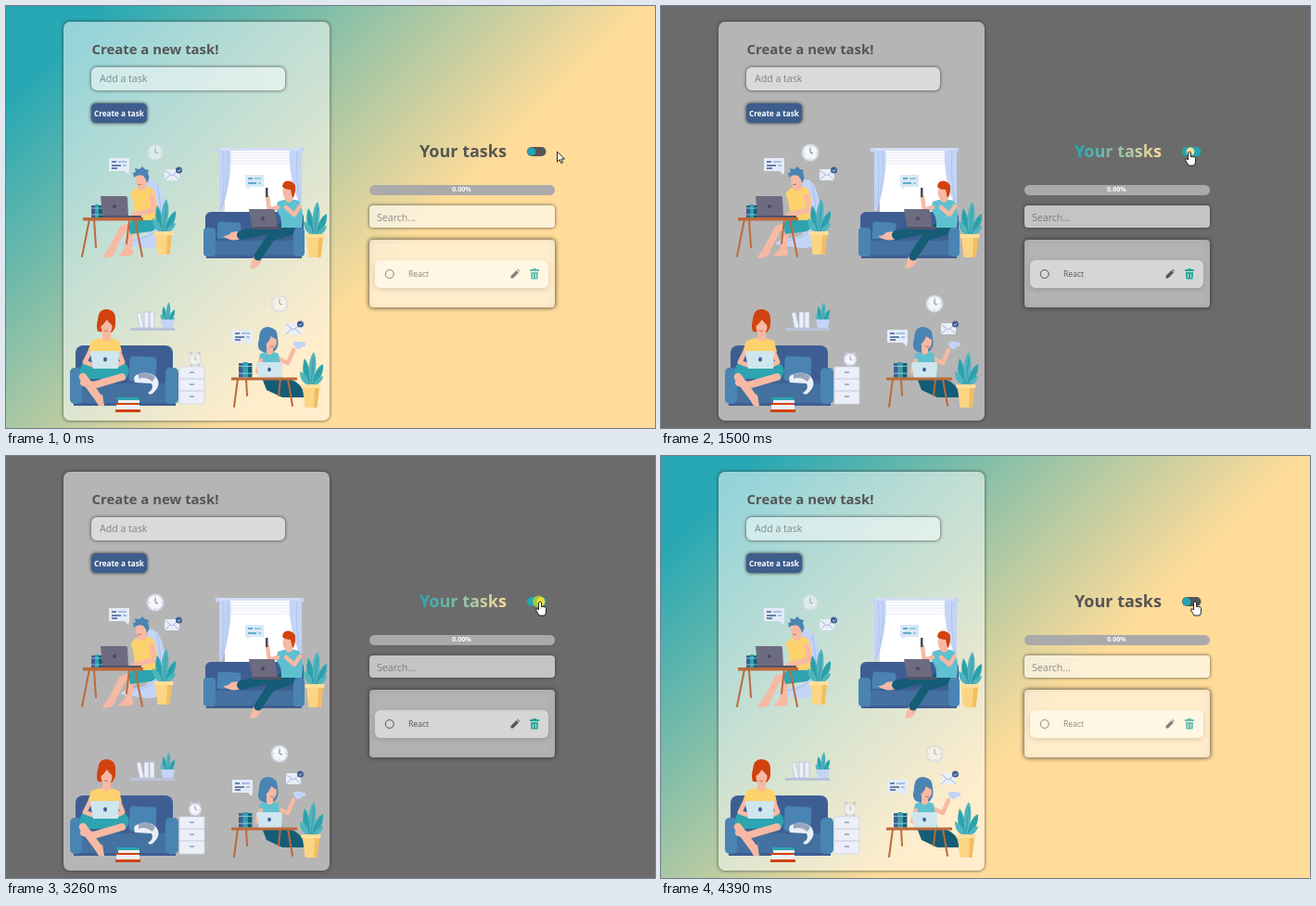
Recreate the animation shown at these times as an HTML page. Size 700 by 455 pixels, loop 4.51 s.

```html
<!DOCTYPE html>
<html lang="en">
<head>
<meta charset="utf-8">
<title>Task list theme toggle</title>
<style>
html, body { margin: 0; width: 100%; height: 100%; overflow: hidden; }
#stage { position: relative; width: 700px; height: 455px; overflow: hidden;
  background: linear-gradient(135deg, #27a8b4 9%, #ffdc99 60%); }
#stage.dark { background: #6b6b6b; }
#stage div { position: absolute; box-sizing: border-box; }
svg { position: absolute; left: 0; top: 0; }
text { font-family: "Open Sans", "Noto Sans", sans-serif; }
.bold { font-weight: 700; }

#panel { left: 62px; top: 17px; width: 287px; height: 430px; border-radius: 7px;
  background: #ffffff80; box-shadow: 0 0 3px 1px #3338; }
#field { left: 92px; top: 66px; width: 209px; height: 25px; border-radius: 6px;
  background: #ffffff80; box-shadow: 0 0 3px 1px #3338; }
#button { left: 92px; top: 105px; width: 60px; height: 21px; border-radius: 5px;
  background: #3d5d8d; box-shadow: 0 0 3px 1px #333a; }
#bar { left: 392px; top: 193px; width: 200px; height: 11px; border-radius: 6px; background: #aaa; }
#search { left: 392px; top: 215px; width: 200px; height: 24px; border-radius: 4px;
  background: #fff9; box-shadow: 0 0 3px 1px #3338; }
#list { left: 392px; top: 252px; width: 200px; height: 73px; border-radius: 4px;
  background: #ffffff7c; box-shadow: 0 0 4px 1px #333b, inset 0 0 8px #0001; }
#item { left: 398px; top: 274px; width: 187px; height: 30px; border-radius: 6px;
  background: #ffffff74; box-shadow: 0 2px 6px #0002; }

.s { fill: #f7b9a3; } .y { fill: #fdd26d; } .n { fill: #3e5e93; }
.b { fill: #4a84b3; } .t { fill: #2da4af; } .d { fill: #155c76; }
.l { fill: #c3d4f7; } .w { fill: #eceff8; } .o { fill: #bb6a3b; }
.r { fill: #d2420f; } .g { fill: #6d6b80; } .c { fill: #5fc0cf; }
.i { fill: #cfe6ee; }
.limb { fill: none; stroke: #f7b9a3; stroke-linecap: round; stroke-linejoin: round; }
.leg { stroke: #155c76; }
.line { fill: none; stroke: #bb6a3b; stroke-width: 2; stroke-linecap: round; }
.hint { fill: #505050a0; font-size: 10.6px; }
#heading, #title { fill: #555; }
.dark #heading { fill: url(#sweep); }
#clock { opacity: .6; }
#task { opacity: .7; }
.dark #clock, .dark #task { opacity: 1; }
#pill { fill: #555; }
#knob { fill: #22a6b3; }
.dark #pill { fill: #22a6b3; }
.dark #knob { fill: #ffdc99; }
#hand, #arrow { fill: #fff; stroke: #111; stroke-width: .9; stroke-linejoin: round; }
</style>
</head>
<body>
<div id="stage">
  <div id="panel"></div><div id="field"></div><div id="button"></div>
  <div id="bar"></div><div id="search"></div><div id="list"></div><div id="item"></div>

  <svg width="700" height="455">
    <defs>
      <linearGradient id="sweep" gradientUnits="userSpaceOnUse" x1="446" x2="540">
        <stop stop-color="#22a6b3"/><stop offset="1" stop-color="#ffdc99"/>
      </linearGradient>
      <g id="leaves">
        <path class="t" d="M-1 1C-8-5-11-16-7-28C-2-22 0-10-1 1M1 1C2-8 6-19 13-22C14-12 9-3 1 1"/>
        <path fill="#4fb4bd" d="M0 1C-4-10-3-28 3-35C7-27 6-12 0 1M-1 1C-8 0-12-5-12-14C-6-12-2-6-1 1M1 1C5-5 8-8 13-9C12-3 8 1 1 1"/>
        <path d="M0 0L3-29M-1 0L-7-22M1 0L11-18" fill="none" stroke="#2b8b9c" stroke-width=".6"/>
      </g>
      <g id="plant">
        <use href="#leaves"/>
        <path fill="#fbd583" d="M-9 3H9L6.500 25H-6.500Z"/>
        <path fill="#f3bd5f" d="M4 4H9L6.500 25H3Z"/>
        <rect fill="#ffe09a" x="-10.500" width="21" height="4" rx="1"/>
      </g>
      <g id="clock">
        <circle r="9.500" fill="#cfd6e6"/><circle r="7.700" fill="#f5f6fa"/>
        <path d="M0-5V0L3 1" fill="none" stroke="#777b8c"/>
        <path d="M0-7v1M0 6v1M-7 0h1M6 0h1" stroke="#9aa" stroke-width=".8"/>
      </g>
      <g id="bubble">
        <path fill="#e4ebf8" d="M0 0H22V14L21 18L17 14H0Z"/>
        <path d="M3 4H8M3 8H13M3 11H9" stroke="#3e5e93" stroke-width="1.600"/>
        <path d="M10 4H19M15 8H19" stroke="#8fb4dc" stroke-width="1.600"/>
      </g>
      <g id="mail">
        <path fill="#e9eefa" d="M0 0H16V12H0Z"/>
        <path d="M0 1L8 7L16 1M0 12L6 6M16 12L10 6" fill="none" stroke="#9aa8c9" stroke-width=".8"/>
        <circle class="n" cx="15.500" cy="1" r="3.500"/>
        <path d="M14 1l1.200 1.300L17.500 0" fill="none" stroke="#fff" stroke-width=".8"/>
      </g>
      <g id="books">
        <path class="n" d="M0 1H4V15H0Z"/><path class="t" d="M4 0H8V15H4Z"/><path class="d" d="M8 1H12V15H8Z"/>
        <path d="M0 4H12M0 11H12" stroke="#9cd3df" stroke-width=".8"/>
      </g>
    </defs>

    <text id="title" class="bold" x="92.500" y="52" font-size="14.900">Create a new task!</text>
    <text class="hint" x="101" y="82">Add a task</text>
    <text class="bold" x="95" y="119" font-size="8.200" fill="#fff">Create a task</text>

    <!-- man at a desk -->
    <g>
      <use href="#bubble" x="111" y="164"/><use href="#clock" x="161" y="158"/><use href="#mail" x="171" y="176"/>
      <path class="l" d="M152 188C166 181 173 208 173 238C174 256 168 261 150 261L124 257C122 251 150 250 153 246Z"/>
      <path d="M163 193Q168 215 166 236Q160 250 132 254" fill="none" stroke="#a6bdee"/>
      <path class="limb" stroke-width="7.500" d="M152 238L134 244L132 262"/>
      <path class="limb" stroke-width="7.500" d="M148 234L126 240L114 263"/>
      <path class="s" d="M110 262L118 266Q114 273 104 271ZM128 262H137V268Q130 271 121 269Z"/>
      <path class="t" d="M138 228H163Q165 240 157 243L134 246L132 236Z"/>
      <path class="y" d="M139 197Q148 193 157 196Q164 203 163 231H139Q139 210 134 203Z"/>
      <path class="limb" stroke-width="5.500" d="M157 205L160 220L138 225"/>
      <path class="s" d="M142 190H151V197Q147 201 142 197Z"/>
      <ellipse class="s" cx="146" cy="188" rx="6" ry="8"/>
      <path class="b" d="M138 185L137 180L140 179L139 175L144 176L147 173L150 176L154 177L153 180Q156 186 152 191Q151 186 148 183Q142 181 138 185Z"/>
      <path d="M142 192q2 1.500 4 0" fill="none" stroke="#b65c50" stroke-width=".8"/>
      <use href="#books" x="92" y="214"/>
      <path class="g" d="M102 205H129Q131 205 131 207L132 227H104Z"/><path fill="#55536a" d="M104 226H146V228H104Z"/>
      <circle cx="117" cy="216" r="2" fill="#4b4960"/>
      <path class="line" d="M90 230L82 270M95 230L97 260M139 230L147 270M133 230L130 256"/>
      <path class="o" d="M83 228H148V231.500H83Z"/>
      <use href="#plant" x="170" y="243"/>
    </g>

    <!-- man on a sofa by the window -->
    <g>
      <path fill="#fff" d="M236 156H315V222H236Z"/>
      <path d="M237 158H314M237 161H314M237 164H314M237 167H314M237 170H314" stroke="#e3e8f3"/>
      <path class="l" d="M230 154H242Q245 182 233 221H230ZM319 154H306Q304 182 316 213H319Z"/>
      <path d="M234 156Q237 190 232 219M239 156Q241 185 234 215M314 156Q312 185 317 210" fill="none" stroke="#aebfe9" stroke-width=".8"/>
      <path d="M227 154.500H320" stroke="#d4def3" stroke-width="3"/>
      <circle class="l" cx="228" cy="155" r="2.500"/><circle class="l" cx="319" cy="155" r="2.500"/>
      <path fill="#d9e8f6" d="M258 182H278V195H264L260 198V195H258Z"/>
      <path d="M261 186H266M261 191H270" stroke="#3f94bd" stroke-width="1.500"/>
      <path d="M268 186H275M272 191H275" stroke="#76c6d0" stroke-width="1.500"/>
      <rect class="n" x="215" y="222" width="106" height="42" rx="6"/>
      <rect class="b" x="228" y="233" width="25" height="19" rx="3" transform="rotate(4 240 242)"/>
      <path fill="#44719f" d="M222 251H313V269H222Z"/><path d="M222 252H313" stroke="#345588"/>
      <path class="n" d="M216 269H319V272H216Z"/>
      <rect class="b" x="213" y="239" width="13" height="31" rx="4"/><rect class="b" x="310" y="239" width="12" height="31" rx="4"/>
      <path class="s" d="M250 243L254 251Q243 255 234 248Q240 248 243 244ZM267 270L276 274Q272 284 263 283Z"/>
      <path class="limb leg" stroke-width="10" d="M307 239L276 242L254 247"/>
      <path class="limb leg" stroke-width="9" d="M306 243L286 249L272 270"/>
      <path class="c" d="M293 211Q304 206 316 210Q322 220 319 239H297Q298 226 291 220Z"/>
      <path class="limb" stroke-width="4.500" d="M293 217L284 220L282 206"/>
      <path fill="#4b4960" d="M280 196H282.500V206H280Z"/>
      <path class="limb" stroke-width="4.500" d="M317 216L311 225L302 217"/>
      <path class="s" d="M301 203H309V210Q304 214 301 209Z"/><ellipse class="s" cx="304" cy="201" rx="5.500" ry="8"/>
      <path class="r" d="M298 195Q299 187 307 189Q313 191 312 199Q311 206 309 207L307 198Q301 198 298 195Z"/>
      <path class="g" d="M262 219H288Q290 219 290 221L293 240H266Z"/><path fill="#55536a" d="M266 238H297V241H266Z"/>
      <circle cx="277" cy="229" r="2" fill="#4b4960"/>
      <use href="#plant" x="333" y="246"/>
    </g>

    <!-- woman on a sofa -->
    <g>
      <path fill="#bac3d9" d="M134 347H182V350H134Z"/>
      <path class="w" stroke="#b7c0d6" stroke-width=".7" d="M141 331L145 330L149 347H144ZM149 330H154V347H149ZM155 330H160V347H155Z"/>
      <use href="#leaves" transform="translate(174 341) scale(.62)"/><path class="l" d="M167 338H182L180 347H169Z"/>
      <path class="w" stroke="#cbd3e4" stroke-width=".7" d="M187 389H214V429H187Z"/>
      <path d="M187 402H214M187 415H214" stroke="#c1cadd"/>
      <path d="M198 395H203M198 408H203M198 421H203" stroke="#8f9db9" stroke-width="1.500"/>
      <path d="M198 375l3-2M207 373l3 2M199 388l2-2M209 388l-2-2" stroke="#bcc6dc" stroke-width="2"/>
      <use href="#clock" transform="translate(204 381) scale(.75)"/>
      <rect class="n" x="75" y="366" width="105" height="46" rx="8"/>
      <rect class="b" x="133" y="378" width="29" height="27" rx="4" transform="rotate(3 147 391)"/>
      <path fill="#44719f" d="M78 405H176V428H78Z"/><path d="M78 406H176" stroke="#355789"/>
      <path class="n" d="M73 428H183V431H73Z"/>
      <rect class="b" x="69" y="390" width="13" height="39" rx="5"/><rect class="b" x="172" y="390" width="14" height="39" rx="5"/>
      <path class="w" d="M139 406Q136 398 143 397Q153 393 162 400Q168 408 160 416Q156 421 153 417Q160 413 157 407Z"/>
      <path fill="#9ba5ba" d="M143 397Q152 393 161 400L158 405Q150 399 143 402Z"/>
      <path class="t" d="M82 386H129Q136 393 129 402H87Q75 400 82 386Z"/>
      <path class="limb" stroke-width="8" d="M125 400L94 409L84 406"/>
      <path class="limb" stroke-width="8.500" d="M83 400L100 423"/><path class="s" d="M95 421L104 419L106 431Q100 433 98 428Z"/>
      <path class="y" d="M92 361Q107 354 122 361L125 373L119 375V388H94V375L88 373Z"/>
      <path class="limb" stroke-width="5" d="M90 374L85 384L96 388M122 374L126 384L118 388"/>
      <path class="r" d="M99 351Q97 345 99 338Q100 326 109 327Q119 328 118 340Q119 347 114 352Z"/>
      <path class="s" d="M104 350H113V359Q108 364 104 359Z"/><ellipse class="s" cx="108.500" cy="346" rx="6" ry="8"/>
      <path class="r" d="M101 346Q101 336 108 333Q116 336 117 346Q111 342 109 338Q106 343 101 346Z"/>
      <path d="M106 350q2 1.500 4 0" fill="none" stroke="#b65c50" stroke-width=".8"/>
      <path class="i" d="M92 372H121Q123 372 122 375L121 391H94L91 375Q90 372 92 372Z"/>
      <ellipse class="n" cx="107" cy="381" rx="2" ry="2.500"/>
      <path class="t" d="M119 422H143L144 425H120Z"/><path class="w" d="M121 425H144V428H121Z"/>
      <path class="r" d="M118 428H143V430H118Z"/><path class="w" d="M119 430H144V435H119Z"/><path class="r" d="M118 435H145V438H118Z"/>
    </g>

    <!-- woman with a cup -->
    <g>
      <use href="#clock" x="295" y="321"/><use href="#bubble" x="244" y="349"/><use href="#mail" x="302" y="342"/>
      <path class="d" d="M276 401H302Q322 406 321 422H298L281 414Z"/>
      <path class="limb" stroke-width="4.500" d="M293 380L304 385L310 371"/>
      <path class="c" d="M274 375Q285 370 294 375L298 402H276L272 386Z"/>
      <path class="limb" stroke-width="4.500" d="M275 382L271 394L281 398"/>
      <path class="l" d="M310 362H320Q320 370 315 370Q310 369 310 362ZM320 363h3v4h-4z"/>
      <path class="b" d="M275 372Q270 369 273 359Q273 346 283 346Q293 347 293 358Q295 367 290 372Q282 376 275 372Z"/>
      <path class="s" d="M281 365H288V374Q284 378 281 374Z"/><ellipse class="s" cx="286" cy="362" rx="6" ry="8"/>
      <path class="b" d="M278 367Q276 352 285 351Q293 353 293 360Q288 358 286 356Q284 362 278 367Z"/>
      <path d="M285 367q2 1.200 4 0" fill="none" stroke="#b65c50" stroke-width=".8"/>
      <use href="#books" transform="translate(251 384) scale(1.2 1.1)"/>
      <path class="i" d="M271 384H296Q298 384 298 386L297 401H273L270 386Z"/><ellipse class="n" cx="284" cy="392" rx="1.800" ry="2.300"/>
      <path class="line" d="M250 402L246 432M304 402L309 431M259 402L260 420M296 402L294 420"/>
      <path class="o" d="M243 400.500H314V403.500H243Z"/>
      <use href="#plant" x="329" y="408"/>
    </g>

    <text id="heading" class="bold" x="446" y="163" font-size="18">Your tasks</text>
    <rect id="pill" x="562" y="152" width="20.500" height="10" rx="5"/>
    <circle id="knob" cy="157" r="4.400"/>
    <text class="bold" x="481" y="200.300" font-size="7.200" fill="#fff">0.00%</text>
    <text class="hint" x="400" y="231.500">Search...</text>
    <g id="task">
      <circle cx="413.700" cy="289" r="4.500" fill="none" stroke="#555"/>
      <text x="434" y="292" font-size="8.600" fill="#555">React</text>
      <path fill="#555" d="M544.500 293.500V291L550.500 285L553 287.500L547 293.500ZM551.200 284.300L552 283.700L554 285.700L553.500 286.600Z"/>
      <path fill="#22a699" d="M565 284H568V283H572V284H575V286H565ZM566 287H574L573.500 294.500H566.500Z"/>
      <path d="M568.500 288.500V293M571.500 288.500V293" stroke="#dff0ea" stroke-width=".8"/>
    </g>

    <circle id="click" cy="157" r="6.500" fill="#e2e000" opacity=".65"/>
    <path id="arrow" d="M0 0V11L2.600 8.600L4.400 12.500L6 11.800L4.300 8H8Z"/>
    <path id="hand" d="M-1.500 1Q0-1 1.500 1V5.500Q6.500 5 6.500 7.500V11Q6.500 13 5 15H-1Q-2 13-4.500 9Q-4.500 7-2.500 8L-1.500 9Z"/>
  </svg>
</div>
<script>
const LOOP = 4510;
// time, pointer x, knob x, dark theme, click ring
const steps = [
  [0, 594, 567], [130, 592, 567], [250, 588, 567], [370, 585, 567], [500, 583, 567],
  [740, 579, 567], [870, 573, 567], [1000, 570, 567],
  [1250, 570, 567, 0, 1], [1500, 570, 571, 1], [1630, 570, 577, 1],
  [2000, 571, 577, 1], [2130, 572, 577, 1], [2250, 574, 577, 1], [2380, 575, 577, 1], [2510, 576, 577, 1],
  [3260, 576, 577, 1, 1], [3510, 576, 577, 1],
  [3630, 576, 568], [4390, 576, 567]
];
const $ = id => document.getElementById(id);
const show = (id, on) => $(id).style.display = on ? "" : "none";

function draw() {
  const t = performance.now() % LOOP;
  const [, x, knob, dark, ring] = steps.findLast(s => s[0] <= t);
  const overToggle = x < 582;
  $("stage").classList.toggle("dark", !!dark);
  $("knob").setAttribute("cx", knob);
  $("click").setAttribute("cx", x - 1.5);
  show("click", ring);
  show("hand", overToggle);
  show("arrow", !overToggle);
  $("arrow").setAttribute("transform", `translate(${x + .5} 157)`);
  $("hand").setAttribute("transform", `translate(${x} 157)`);
  requestAnimationFrame(draw);
}
draw();
</script>
</body>
</html>
```
